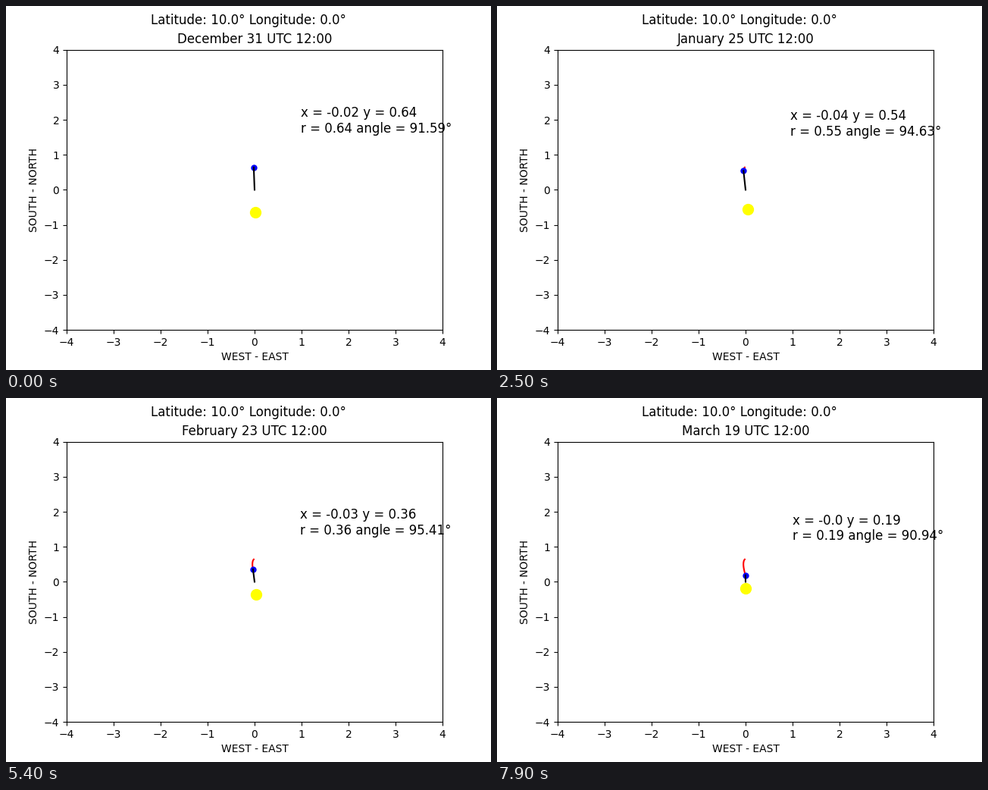
Animation of 640 by 480 pixels, one loop 8 s. Source, as a matplotlib script:

```python
import numpy as np
import matplotlib.pyplot as plt
from matplotlib.animation import FuncAnimation

DAYS = 80
LAT, LON = 10.0, 0.0
TILT = np.radians(23.45)
YEAR, EQUINOX = 365.25, 80.185

# Month name, days shown, days of the year before the month
MONTHS = [("January", 31, 0), ("February", 29, 31), ("March", 31, 59)]


def calendar():
    """Consecutive (label, day of year) pairs, starting on New Year's Eve."""
    days = [("December 31", 365)]
    for name, length, before in MONTHS:
        days += [(f"{name} {d}", before + d) for d in range(1, length + 1)]
    return days[:DAYS]


def shadow(day):
    """Tip of the noon shadow (east, north) for a circular orbit."""
    lon = 2 * np.pi * (day - EQUINOX) / YEAR
    ra = np.arctan2(np.cos(TILT) * np.sin(lon), np.cos(lon))
    dec = np.arcsin(np.sin(TILT) * np.sin(lon))
    hour = lon - ra
    phi = np.radians(LAT)
    east = np.cos(dec) * np.sin(hour)
    north = np.cos(dec) * np.cos(hour) * np.sin(phi) - np.sin(dec) * np.cos(phi)
    up = np.sin(phi) * np.sin(dec) + np.cos(phi) * np.cos(dec) * np.cos(hour)
    return np.cos(phi) * east / up, np.cos(phi) * north / up


labels, doy = zip(*calendar())
xs, ys = shadow(np.array(doy, dtype=float))

fig, ax = plt.subplots(figsize=(6.4, 4.8), dpi=100)
fig.suptitle(f"Latitude: {LAT}° Longitude: {LON}°", fontsize=12)
ax.set_xlim(-4, 4)
ax.set_ylim(-4, 4)
ax.set_xlabel("WEST - EAST")
ax.set_ylabel("SOUTH - NORTH")
title = ax.set_title("", fontsize=12)

trail, = ax.plot([], [], color="red", lw=1.5)
sun, = ax.plot([], [], "o", color="yellow", markersize=10)
tip, = ax.plot([], [], "o", color="blue", markersize=5)
pole, = ax.plot([], [], color="black", lw=1.5)
info = ax.text(0, 0, "", fontsize=12)


def update(i):
    x, y = float(xs[i]), float(ys[i])
    r = float(np.hypot(x, y))
    angle = float(np.degrees(np.arctan2(y, x)))
    title.set_text(f"{labels[i]} UTC 12:00")
    trail.set_data(xs[:i + 1], ys[:i + 1])
    sun.set_data([-x], [-y])
    tip.set_data([x], [y])
    pole.set_data([0, x], [0, y])
    info.set_position((x + 1, y + 1))
    info.set_text(f"x = {round(x, 2)} y = {round(y, 2)}\n"
                  f"r = {round(r, 2)} angle = {round(angle, 2)}°")
    return trail, sun, tip, pole, info, title


anim = FuncAnimation(fig, update, frames=DAYS, interval=100,
                     repeat=True, repeat_delay=0, blit=False)
plt.show()
```
